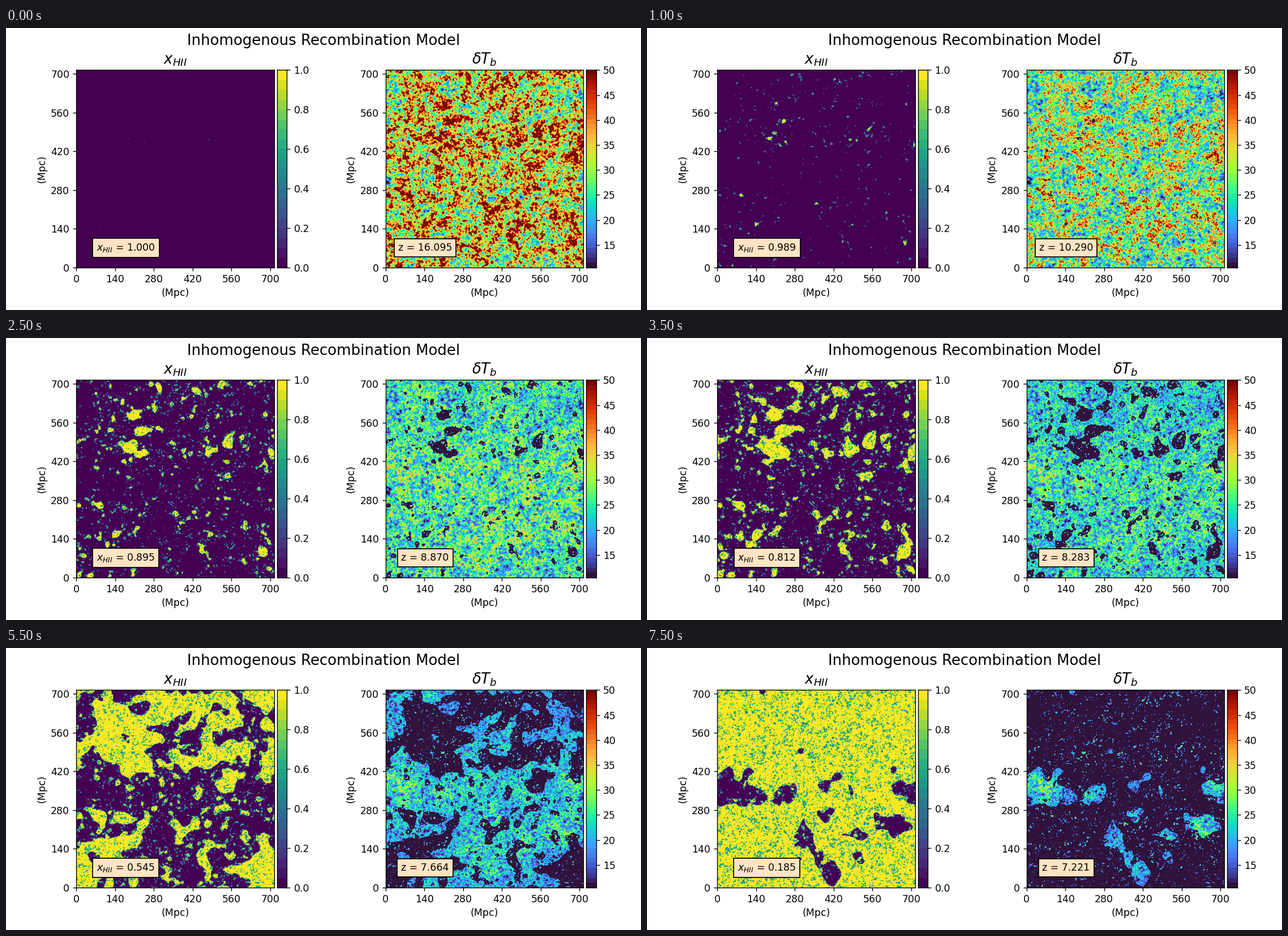
Recreate the animation shown at these times as a matplotlib script. Size 1122 px wide and 499 px high, loop 8000 ms.

```python
import numpy as np
import matplotlib.pyplot as plt
from matplotlib.animation import FuncAnimation
from matplotlib.colors import BoundaryNorm

W, H, DPI = 1122, 499, 125
N, MPC = 256, 2.8  # cells per side, Mpc per cell
FRAMES, INTERVAL = 16, 500
TOP, BOTTOM, SIDE = 74.3, 423.7, 349.4  # panel box in pixels

# Key points of the history: step, neutral fraction, redshift
HISTORY = np.array([(0, 1, 16.095), (2, .989, 10.290), (4, .936, 9.164),
                    (7, .812, 8.283), (9, .654, 7.859), (11, .545, 7.664),
                    (15, .185, 7.221)])

# Centres in Mpc of the regions ionized first and last
RICH = [(320, 640), (520, 570), (680, 620), (150, 550), (40, 60), (640, 60)]
VOIDS = [(20, 400), (80, 340), (230, 330), (330, 130),
         (390, 270), (490, 160), (640, 220), (670, 370)]

rng = np.random.default_rng(21)
freq = 2 * np.pi * np.fft.fftfreq(N)
k2 = freq[:, None] ** 2 + freq ** 2
gy, gx = np.mgrid[:N, :N] * MPC


def smooth(field, sigma):
    return np.fft.ifft2(np.fft.fft2(field) * np.exp(-k2 * sigma ** 2 / 2)).real


def unit(field):
    return (field - field.mean()) / field.std()


def grain(sigma):
    return unit(smooth(rng.standard_normal((N, N)), sigma))


def blobs(centres, radius):
    return sum(np.exp(-((gx - x) ** 2 + (gy - y) ** 2) / (2 * radius ** 2))
               for x, y in centres)


fine = grain(.65)
density = unit(.8 * fine + .5 * grain(1.5) + .45 * grain(4) + .2 * grain(10))
basin = blobs(RICH, 60) - blobs(VOIDS, 42) + .25 * grain(9)
sources = np.exp(1.2 * density + .35 * basin)
score = np.max([smooth(sources, s) for s in (1.2, 2, 3.2, 5)], axis=0)

# Dense cells recombine first
order = .6 * rng.standard_normal((N, N)) + fine + .35 * grain(2)
recombination_rank = 1 - order.ravel().argsort().argsort().reshape(N, N) / N ** 2
leftover = rng.uniform(.2, .7, (N, N))


def ionized_field(threshold, fraction):
    # Large-scale structure matters more as bubbles merge
    bias = np.exp(2 * fraction ** 2 * basin)
    partial = np.clip(.9 * (sources * bias / threshold - .7), 0, .8)
    recombined = recombination_rank < .23 * fraction ** .4
    inside = np.where(recombined, 1 - leftover, 1)
    return np.where(score * bias > threshold, inside, partial)


def solve_ionization(neutral):
    """Bisect the source threshold that gives the wanted mean."""
    fraction = max(1 - neutral, 5e-5)
    low, high = -6, 10
    for _ in range(24):
        mid = (low + high) / 2
        if ionized_field(np.exp(mid), fraction).mean() > fraction:
            low = mid
        else:
            high = mid
    return ionized_field(np.exp(high), fraction)


def brightness(ionized, z):
    return 26.5 * np.sqrt((1 + z) / 10) * np.exp(.33 * density) * (1 - ionized)


fig = plt.figure(figsize=(W / DPI, H / DPI), dpi=DPI, facecolor="white")
fig.suptitle("Inhomogenous Recombination Model", fontsize=15)


def pixel_axes(left, width):
    return fig.add_axes([left / W, 1 - BOTTOM / H, width / W, (BOTTOM - TOP) / H])


def make_panel(left, title, cmap, levels, bar_ticks, box_x):
    norm = BoundaryNorm(levels, 256, clip=True)
    ax = pixel_axes(left, SIDE)
    image = ax.imshow(np.zeros((N, N)), cmap=cmap, norm=norm, origin="lower",
                      interpolation="bilinear", interpolation_stage="data",
                      aspect="auto", extent=(-.5, N - .5, -.5, N - .5))
    cells = np.arange(0, 251, 50)
    names = [f"{c * MPC:.0f}" for c in cells]
    ax.set(xlim=(0, N - 1), ylim=(0, N - 1))
    ax.set_xlabel("(Mpc)", labelpad=3.5)
    ax.set_ylabel("(Mpc)")
    ax.set_xticks(cells, names)
    ax.set_yticks(cells, names)
    ax.set_title(title, fontsize=15)
    label = ax.text(box_x, .1, "", transform=ax.transAxes, ha="center", va="center",
                    bbox=dict(facecolor="bisque", edgecolor="black"))

    bar = pixel_axes(left + SIDE + 5, SIDE / 20)
    middles = (levels[:-1] + levels[1:]) / 2
    bar.imshow(middles[:, None], cmap=cmap, norm=norm, origin="lower",
               interpolation="nearest", aspect="auto",
               extent=(0, 1, levels[0], levels[-1]))
    bar.set_xticks([])
    bar.yaxis.tick_right()
    bar.set_yticks(bar_ticks)
    return image, label


ion_image, ion_label = make_panel(124.4, "$x_{HII}$", "viridis",
                                  np.linspace(0, 1, 21), np.linspace(0, 1, 6), .25)
temp_image, temp_label = make_panel(670.7, r"$\delta T_b$", "turbo",
                                    np.linspace(10.5, 50, 41), range(15, 51, 5), .2)


def update(i):
    steps, neutrals, redshifts = HISTORY.T
    neutral = np.interp(i, steps, neutrals)
    z = np.interp(i, steps, redshifts)
    ionized = solve_ionization(neutral)
    ion_image.set_data(ionized)
    temp_image.set_data(brightness(ionized, z))
    ion_label.set_text(f"$x_{{HII}}$ = {neutral:.3f}")
    temp_label.set_text(f"z = {z:.3f}")
    return ion_image, temp_image, ion_label, temp_label


anim = FuncAnimation(fig, update, frames=FRAMES, interval=INTERVAL,
                     repeat=True, repeat_delay=0)
plt.show()
```
